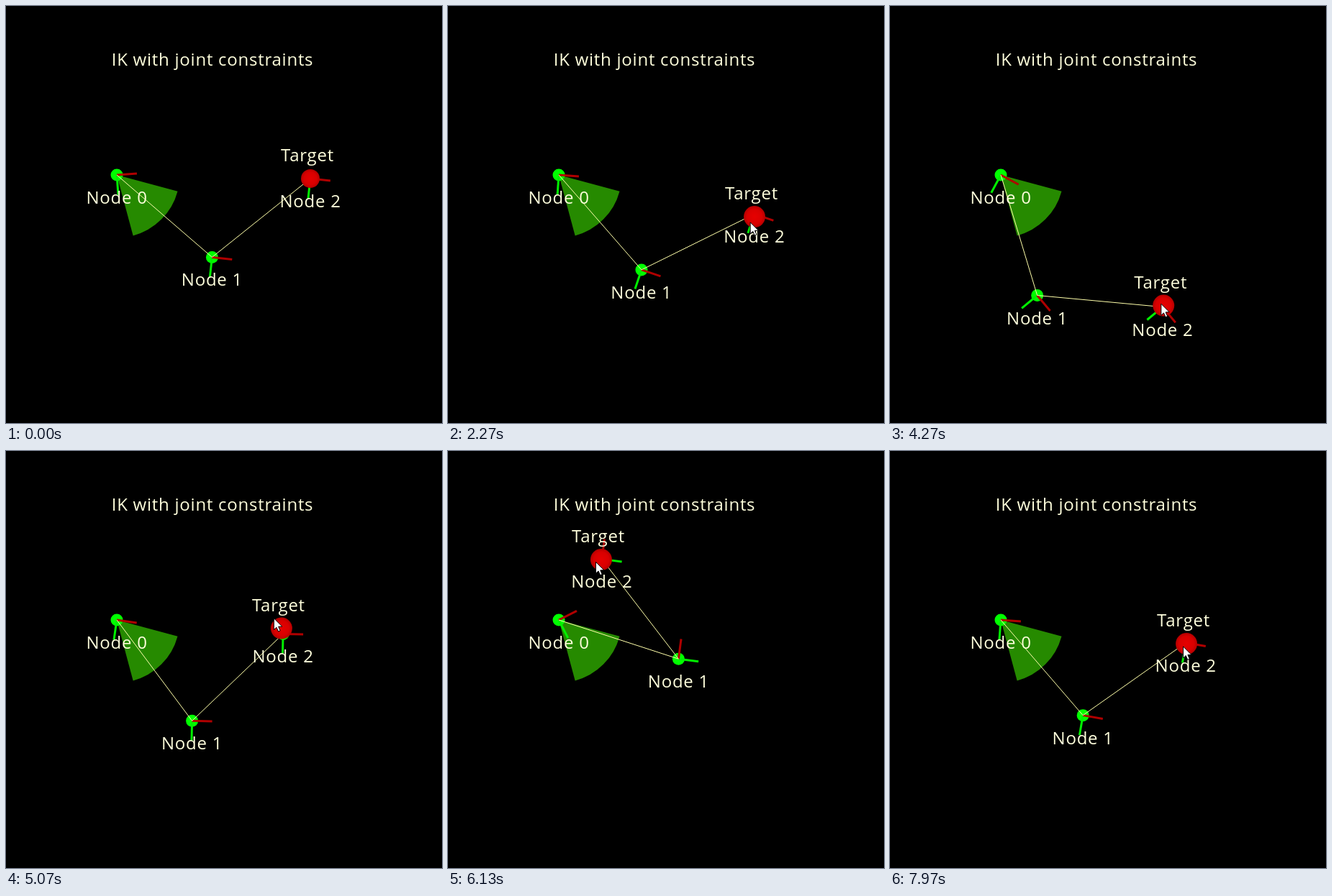
An HTML page with a canvas for the animation above (8 s loop, 606x580 px).

```html
<!DOCTYPE html>
<html lang="en">
<head>
<meta charset="utf-8">
<title>IK with joint constraints</title>
<style>
  html, body { margin: 0; width: 100%; height: 100%; overflow: hidden; background: #000; }
  canvas { display: block; }
</style>
</head>
<body>
<canvas id="stage" width="606" height="580"></canvas>
<script>
const ctx = document.getElementById('stage').getContext('2d');
const LOOP = 8000;
const BONE = 175;
const ROOT = { x: 154, y: 235 };
const DEG = Math.PI / 180;
const MIN_ANGLE = 15 * DEG, MAX_ANGLE = 75 * DEG;
const SOLVER_LAG = 20, CURSOR_LEAD = 40;
const CURSOR_IN = 250, CURSOR_GRAB = 850;
const GREEN = '#00ff00', RED = '#b00000', TEXT = '#ffffdc', LINE = '#ffffaa';

// Drag path of the red ball: time, x, y
const path = [
  [0, 423, 240], [1980, 423, 240], [2230, 425.5, 284.5], [2270, 426, 293],
  [2500, 426, 312], [2800, 418, 345], [3100, 392, 398], [3300, 370, 425],
  [3330, 368, 430], [3650, 352, 450], [4200, 376, 423], [4600, 400, 368],
  [4750, 402, 340], [5030, 387, 262], [5070, 383, 247], [5110, 378, 232],
  [5500, 312, 165], [5870, 240, 142], [6130, 213, 151], [6400, 207, 158],
  [6680, 205, 158], [6900, 226, 137], [6930, 231, 134], [6960, 236.5, 131],
  [7080, 262, 127], [7300, 320, 150], [7500, 372, 195], [7750, 400, 240],
  [7970, 412, 268], [8000, 413, 269]
];

const clamp = (v, lo, hi) => Math.min(hi, Math.max(lo, v));

function slope(i, k) {
  const a = path[i], b = path[i + 1];
  return (b[k] - a[k]) / (b[0] - a[0]);
}

// Harmonic mean of neighbouring slopes keeps the curve free of overshoot
function tangent(i, k) {
  if (i === 0) return slope(0, k);
  if (i === path.length - 1) return slope(i - 1, k);
  const a = slope(i - 1, k), b = slope(i, k);
  return a * b <= 0 ? 0 : 2 * a * b / (a + b);
}

function goalAt(time) {
  const t = clamp(time, 0, LOOP);
  let i = 0;
  while (i < path.length - 2 && t >= path[i + 1][0]) i++;
  const p = path[i], q = path[i + 1];
  const span = q[0] - p[0], u = (t - p[0]) / span;
  const blend = u * u * (3 - 2 * u);
  const axis = k => p[k] + (q[k] - p[k]) * blend +
    span * u * (1 - u) * (tangent(i, k) * (1 - u) - tangent(i + 1, k) * u);
  return { x: axis(1), y: axis(2) };
}

const along = (p, angle, length) => ({
  x: p.x + Math.cos(angle) * length,
  y: p.y + Math.sin(angle) * length
});
const bearing = (a, b) => Math.atan2(b.y - a.y, b.x - a.x);

function solve(goal) {
  const reach = Math.hypot(goal.x - ROOT.x, goal.y - ROOT.y);
  const bend = Math.acos(clamp(reach / 2 / BONE, 0, 1));
  const rootAngle = clamp(bearing(ROOT, goal) + bend, MIN_ANGLE, MAX_ANGLE);
  const elbow = along(ROOT, rootAngle, BONE);
  const elbowAngle = bearing(elbow, goal);
  return { rootAngle, elbow, elbowAngle, tip: along(elbow, elbowAngle, BONE) };
}

function line(a, b, color, width) {
  ctx.strokeStyle = color;
  ctx.lineWidth = width;
  ctx.beginPath();
  ctx.moveTo(a.x, a.y);
  ctx.lineTo(b.x, b.y);
  ctx.stroke();
}

function disc(p, radius, fill) {
  ctx.fillStyle = fill;
  ctx.beginPath();
  ctx.arc(p.x, p.y, radius, 0, Math.PI * 2);
  ctx.fill();
}

function node(p, angle) {
  disc(p, 8.5, GREEN);
  line(p, along(p, angle + Math.PI / 2, 28), '#00f000', 3);
  line(p, along(p, angle, 28), RED, 3);
}

function wedge() {
  ctx.fillStyle = '#268a00';
  ctx.beginPath();
  ctx.moveTo(ROOT.x, ROOT.y);
  ctx.arc(ROOT.x, ROOT.y, BONE / 2, MIN_ANGLE, MAX_ANGLE);
  ctx.fill();
}

function ball(p, radius) {
  const shade = ctx.createRadialGradient(p.x, p.y, 0, p.x, p.y, radius);
  shade.addColorStop(0, '#e60000');
  shade.addColorStop(0.7, '#d80000');
  shade.addColorStop(1, '#b40000');
  disc(p, radius, shade);
}

function label(text, x, y) {
  ctx.fillStyle = TEXT;
  ctx.fillText(text, x, y);
}

function cursorAt(t) {
  const now = goalAt(t), before = goalAt(t - 15), after = goalAt(t + 15);
  const lead = CURSOR_LEAD / 30;
  const grip = {
    x: now.x - 6 + (after.x - before.x) * lead,
    y: now.y + 2 + (after.y - before.y) * lead
  };
  const u = clamp((t - CURSOR_IN) / (CURSOR_GRAB - CURSOR_IN), 0, 1);
  const e = u * u * (3 - 2 * u);
  return { x: 579 + (grip.x - 579) * e, y: 300 + (grip.y - 300) * e };
}

function arrow(p) {
  ctx.save();
  ctx.translate(p.x, p.y);
  ctx.beginPath();
  ctx.moveTo(0, 0);
  for (const [x, y] of [[0, 16], [3.6, 12.6], [6.2, 18.4], [8.8, 17.2], [6.3, 11.6], [11.4, 11.4]]) {
    ctx.lineTo(x, y);
  }
  ctx.closePath();
  ctx.fillStyle = '#fff';
  ctx.fill();
  ctx.strokeStyle = '#000';
  ctx.lineWidth = 1;
  ctx.stroke();
  ctx.restore();
}

function draw(t) {
  const goal = goalAt(t);
  const { rootAngle, elbow, elbowAngle, tip } = solve(goalAt(t - SOLVER_LAG));
  const outer = elbowAngle + 45 * DEG;

  ctx.fillStyle = '#000';
  ctx.fillRect(0, 0, 606, 580);

  wedge();
  node(ROOT, rootAngle - 45 * DEG);
  node(elbow, outer);
  node(tip, outer);
  line(ROOT, elbow, LINE, 1);
  line(elbow, tip, LINE, 1);
  ball(goal, t < CURSOR_GRAB ? 13 : 15);

  ctx.font = '24px "Open Sans", "Noto Sans", sans-serif';
  ctx.letterSpacing = '0.75px';
  ctx.textAlign = 'center';
  label('IK with joint constraints', 287, 83);
  [ROOT, elbow, tip].forEach((p, i) => label('Node ' + i, p.x, p.y + 40));
  label('Target', goal.x - 4, goal.y - 24);

  if (t >= CURSOR_IN) arrow(cursorAt(t));
}

const start = performance.now();
function tick() {
  draw((performance.now() - start) % LOOP);
  requestAnimationFrame(tick);
}
tick();
</script>
</body>
</html>
```
